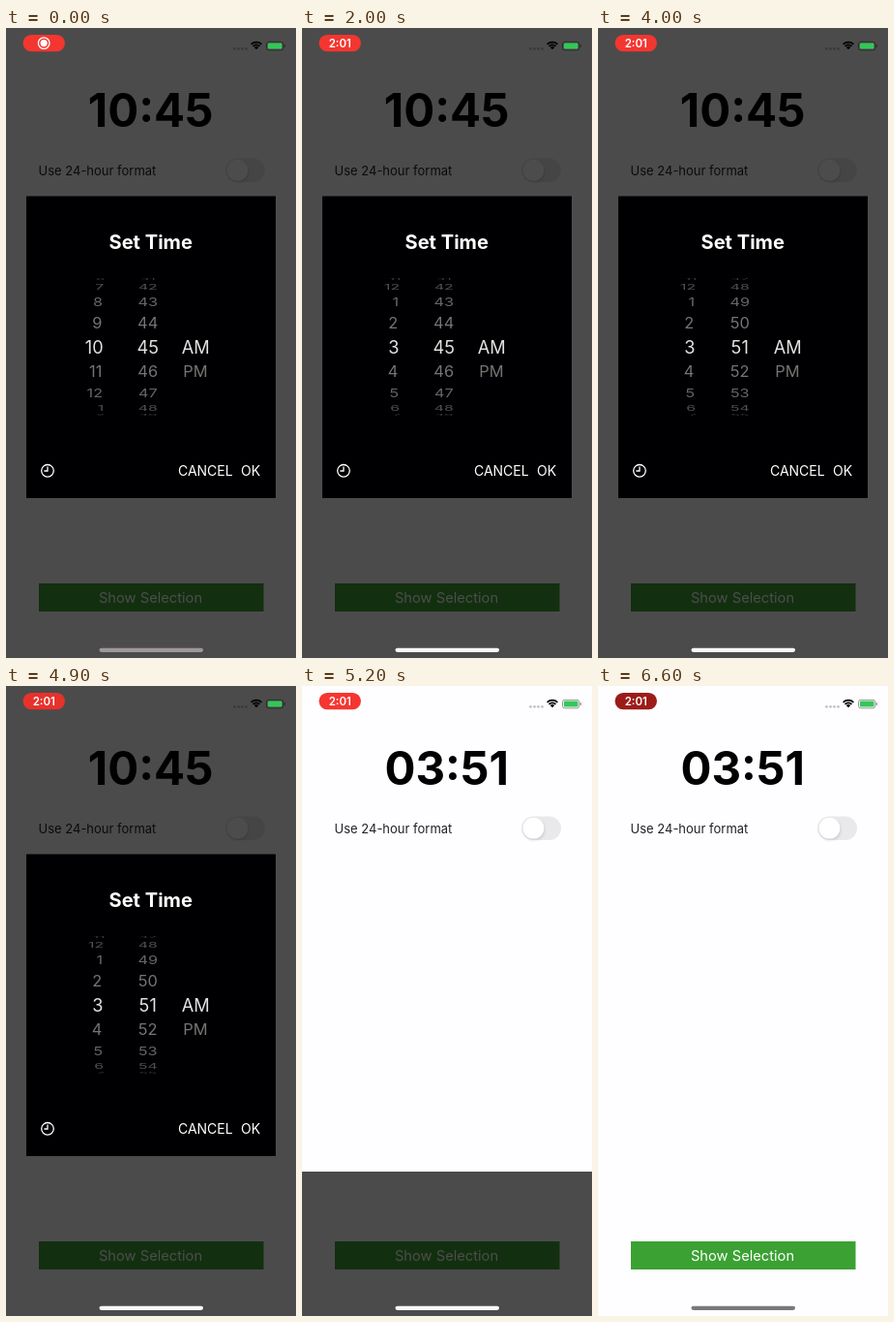
Animation, 300 px wide and 650 px high, one loop 6.65 s. Source, as an HTML page with a canvas:

```html
<!DOCTYPE html>
<html lang="en">
<head>
<meta charset="utf-8">
<title>Set Time</title>
<style>
  html, body { margin: 0; width: 100%; height: 100%; overflow: hidden; background: #fefdff; }
  canvas { display: block; width: 300px; height: 650px; }
</style>
</head>
<body>
<canvas id="stage"></canvas>
<script>
const W = 300, H = 650, LOOP = 6650, TICK = 50;
const FONT = 'Inter, "Liberation Sans", sans-serif';
const canvas = document.getElementById('stage');
const c = canvas.getContext('2d');
const dpr = window.devicePixelRatio || 1;
canvas.width = W * dpr;
canvas.height = H * dpr;

const span = (t, from, to) => Math.min(1, Math.max(0, (t - from) / (to - from)));
const smooth = u => u * u * (3 - 2 * u);
const flick = u => 1 - (1 - u) ** 3;
const mix = (a, b, u) => `rgb(${a.map((v, i) => Math.round(v + (b[i] - v) * u))})`;
const wrap = (n, size) => ((n % size) + size) % size;

function rect(x, y, w, h, color) {
  c.fillStyle = color;
  c.fillRect(x, y, w, h);
}

function pill(x, y, w, h, r, color) {
  c.beginPath();
  c.roundRect(x, y, w, h, r);
  c.fillStyle = color;
  c.fill();
}

function disc(x, y, r, color) {
  c.beginPath();
  c.arc(x, y, r, 0, 7);
  c.fillStyle = color;
  c.fill();
}

function ring(x, y, r, width, color, from = 0, to = 7) {
  c.beginPath();
  c.arc(x, y, r, from, to);
  c.lineWidth = width;
  c.strokeStyle = color;
  c.stroke();
}

function text(str, x, y, size, color, weight = 400, align = 'center') {
  c.font = `${weight} ${size}px ${FONT}`;
  c.textAlign = align;
  c.fillStyle = color;
  c.fillText(str, x, y);
}

function page(t) {
  rect(0, 0, W, H, '#fefdff');
  text(t < 5000 ? '10:45' : '03:51', 149.7, 102, 47.4, '#000', 700);
  text('Use 24-hour format', 33.5, 151.5, 13, '#222', 400, 'left');

  pill(227, 134.5, 41, 24.5, 12.25, '#e9e8eb');
  c.save();
  c.shadowColor = 'rgba(0,0,0,.13)';
  c.shadowBlur = 3 * dpr;
  c.shadowOffsetX = 0.7 * dpr;
  c.shadowOffsetY = 1.5 * dpr;
  disc(239.5, 146.7, 10.9, '#fff');
  c.restore();

  rect(34, 573, 232.5, 29, '#3aa132');
  text('Show Selection', 149.5, 593.3, 14.7, '#fff');
}

// Picker column: labels on a cylinder, with a brighter, larger selection band.
const MID = 329.5, BAND = 13, RADIUS = 70.5, STEP = 20.9 * Math.PI / 180;

function wheel(pos, label, x, align, min = -Infinity, max = Infinity) {
  for (const selected of [false, true]) {
    c.save();
    c.beginPath();
    c.rect(21, MID - BAND, 258, 2 * BAND);
    if (!selected) c.rect(21, MID - 80, 258, 160);
    c.clip('evenodd');
    const first = Math.max(min, Math.ceil(pos - 4.2));
    const last = Math.min(max, Math.floor(pos + 4.2));
    for (let n = first; n <= last; n++) {
      const angle = (n - pos) * STEP, cos = Math.cos(angle);
      const depth = 1 - 0.075 * (1 - cos);
      const size = selected ? 18.2 : 16.5;
      const edge = selected && align === 'right' ? x + 1.5 : x;
      c.save();
      c.translate(150 + (edge - 150) * depth, MID + RADIUS * Math.sin(angle));
      c.scale(depth, cos);
      const gray = selected ? 226 : Math.round(122 * (0.4 + 0.6 * cos));
      text(label(n), 0, size * 0.364, size, `rgb(${gray},${gray},${gray})`, 400, align);
      c.restore();
    }
    c.restore();
  }
}

function dialog(t) {
  rect(21, 173.5, 258, 311.5, '#000002');
  text('Set Time', 149.7, 227.7, 20.1, '#fff', 700);

  const hour = 10 - 7 * flick(span(t, 720, 1620));
  const minute = 45 + 6 * flick(span(t, 2330, 3250));
  wheel(hour, n => String(wrap(n - 1, 12) + 1), 99.1, 'right');
  wheel(minute, n => String(wrap(n, 60)).padStart(2, '0'), 146.7, 'center');
  wheel(0, n => ['AM', 'PM'][n], 196.2, 'center', 0, 1);

  ring(43, 456.8, 6.3, 1.3, '#fff');
  c.beginPath();
  c.moveTo(43, 452.6);
  c.lineTo(43, 457);
  c.lineTo(39.4, 457);
  c.stroke();
  text('CANCEL', 206.3, 462, 14, '#fff');
  text('OK', 253, 462, 14, '#fff');
}

function statusBar(t) {
  const dim = ((1 - Math.cos(2 * Math.PI * (t / 1000 - 0.12))) / 2) ** 2;
  pill(17.5, 7, 43.5, 17.2, 8.6, mix([246, 54, 48], [155, 28, 26], dim));
  const clock = span(t, 400, 650);
  c.globalAlpha = 1 - clock;
  ring(39.2, 15.6, 5.8, 1.3, '#fff');
  disc(39.2, 15.6, 3.6, '#fff');
  c.globalAlpha = clock;
  text('2:01', 39.3, 19.7, 11.5, '#fff', 600);
  c.globalAlpha = 1;

  for (let i = 0; i < 4; i++) disc(236.5 + i * 4, 21.4, 1.35, 'rgba(0,0,0,.24)');

  const left = -Math.PI * 0.75, right = -Math.PI * 0.25;
  ring(259, 22.3, 7.6, 1.7, '#000', left, right);
  ring(259, 22.3, 4.9, 1.7, '#000', left, right);
  ring(259, 22.3, 1.6, 3.2, '#000', left, right);

  c.beginPath();
  c.roundRect(269.5, 14.3, 17.3, 8.6, 2.5);
  c.lineWidth = 0.9;
  c.strokeStyle = 'rgba(0,0,0,.45)';
  c.stroke();
  pill(270.9, 15.6, 14.6, 6, 1.4, '#34c759');
  pill(287.7, 17.1, 1.1, 3, 0.5, 'rgba(0,0,0,.45)');
}

// The home bar turns light over the dimmed page and dark again afterwards.
function homeBar(t) {
  const light = [250, 249, 250];
  const color = t < 5000
    ? mix([158, 152, 155], light, span(t, 0, 900))
    : mix(light, [122, 120, 123], span(t, 5250, 6200));
  pill(96.5, 639.7, 107.5, 4.2, 2.1, color);
}

function draw(now) {
  const t = Math.floor((now % LOOP) / TICK) * TICK;
  c.setTransform(dpr, 0, 0, dpr, 0, 0);
  page(t);

  const slide = H * smooth(span(t, 5004, 5288));
  if (slide < H) {
    c.save();
    c.translate(0, Math.round(slide - 0.5));
    rect(0, 0, W, H, 'rgba(2,0,1,.7)');
    dialog(t);
    c.restore();
  }

  statusBar(t);
  homeBar(t);
  requestAnimationFrame(draw);
}

requestAnimationFrame(draw);
</script>
</body>
</html>
```
